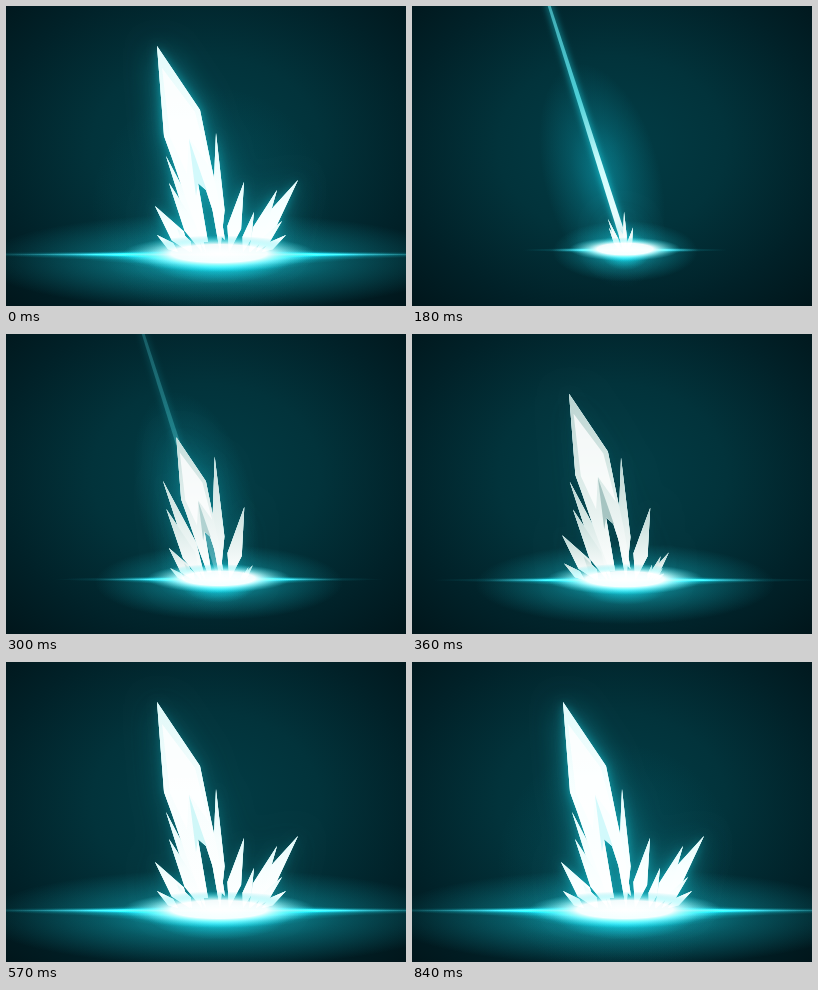
An HTML page with a canvas that plays this animation: 400 by 300 pixels, repeating every 1.34 s.

```html
<!DOCTYPE html>
<html lang="en">
<head>
<meta charset="utf-8">
<title>Ice burst</title>
<style>
html, body { margin: 0; width: 100%; height: 100%; overflow: hidden; background: #01161b; }
canvas { display: block; width: 100vw; height: 100vh; }
</style>
</head>
<body>
<canvas id="stage" width="400" height="300"></canvas>
<script>
const ctx = document.getElementById('stage').getContext('2d');
const LOOP = 1340, STEP = 30, HOLD = 90;
const CX = 213;
const CYAN = '24,196,208', TEAL = '16,150,165';

const rgba = (c, a) => `rgba(${c},${a})`;
const mix = (a, b, p) => a + (b - a) * p;
const ramp = (t, from, to) => Math.min(1, Math.max(0, (t - from) / (to - from)));

// Shoots up to an overshoot, then settles at 1
function burst(t, start, peak, end, over) {
  if (t < peak) return over * Math.sin(ramp(t, start, peak) * Math.PI / 2);
  return mix(1, over, (1 + Math.cos(ramp(t, peak, end) * Math.PI)) / 2);
}

const groups = {
  main:  { x: 213, y: 243, size: t => burst(t, 160, 480, 570, 1.085) },
  mid:   { x: 213, y: 243, size: t => burst(t, 150, 300, 480, 1.04) },
  left:  { x: 195, y: 246, size: t => burst(t, 210, 400, 570, 1.03) },
  right: { x: 235, y: 246, size: t => ramp(t, 230, 570) }
};

// group, tip x, tip y, foot x, width
const spikes = [
  ['mid', 160, 150, 200, 12],
  ['mid', 163, 177, 196, 13],
  ['mid', 210, 127, 214, 12],
  ['mid', 238, 176, 223, 14],
  ['left', 149, 200, 184, 15],
  ['left', 151, 229, 172, 8],
  ['left', 171, 222, 186, 9],
  ['right', 292, 174, 244, 17],
  ['right', 271, 184, 243, 13],
  ['right', 248, 206, 237, 9],
  ['right', 276, 215, 250, 9],
  ['right', 280, 229, 256, 8]
];
const body = [
  151, 40, 194, 104, 205, 158, 212, 190, 219, 234, 215, 230, 200, 184,
  192, 177, 202, 236, 196, 236, 181, 196, 166, 152, 158, 130
];
const facet = [156, 62, 189, 106, 203, 160, 183, 132, 181, 168, 164, 131];
const cleft = [183, 133, 201, 185, 192, 177, 190, 190];

// Kite that is widest near its foot
function kite(tx, ty, fx, width) {
  const fy = 246, dx = fx - tx, dy = fy - ty, len = Math.hypot(dx, dy);
  const mx = tx + dx * .65, my = ty + dy * .65;
  const nx = -dy / len * width / 2, ny = dx / len * width / 2;
  return [tx, ty, mx - nx, my - ny, fx, fy, mx + nx, my + ny];
}

// Scales points from the group's root; an overshoot also leans left
function grow(name, pts, t) {
  const { x, y, size } = groups[name], s = size(t);
  const lean = -.25 * Math.max(0, s - 1);
  const c = s * Math.cos(lean), n = s * Math.sin(lean), out = [];
  for (let i = 0; i < pts.length; i += 2) {
    const dx = pts[i] - x, dy = pts[i + 1] - y;
    out.push(x + dx * c - dy * n, y + dx * n + dy * c);
  }
  return out;
}

function poly(pts) {
  const path = new Path2D();
  path.moveTo(pts[0], pts[1]);
  for (let i = 2; i < pts.length; i += 2) path.lineTo(pts[i], pts[i + 1]);
  path.closePath();
  return path;
}

// Soft ellipse; stops are offset/colour pairs
function glow(x, y, rx, ry, stops, turn = 0) {
  ctx.save();
  ctx.translate(x, y);
  ctx.rotate(turn);
  ctx.scale(rx, ry);
  const g = ctx.createRadialGradient(0, 0, 0, 0, 0, 1);
  stops.forEach(([o, c]) => g.addColorStop(o, c));
  ctx.fillStyle = g;
  ctx.fillRect(-1, -1, 2, 2);
  ctx.restore();
}

const fade = (c, a) => [[0, rgba(c, a)], [.5, rgba(c, a * .42)], [1, rgba(c, 0)]];

function backdrop() {
  ctx.fillStyle = '#01161b';
  ctx.fillRect(0, 0, 400, 300);
  glow(200, 140, 285, 225, [[0, '#023d46'], [.4, '#02333b'], [.75, '#012128'], [1, '#01161b']]);
}

function drawBeam(t) {
  const alpha = 1 - ramp(t, 240, 330);
  if (!alpha) return;
  const len = mix(38, 260, ramp(t, 90, 180));
  const x = 214.5, y = 243, tx = x - .303 * len, ty = y - .953 * len;
  const w = Math.min(3.6, 2 + len / 100), tip = len / 180;
  const g = ctx.createLinearGradient(x, y, tx, ty);
  g.addColorStop(0, '#ffffff');
  g.addColorStop(.35, '#c9fbfc');
  g.addColorStop(.6, '#4fd0d8');
  g.addColorStop(1, '#3fa9b2');
  ctx.save();
  ctx.globalAlpha = alpha;
  ctx.shadowColor = '#19c6d4';
  ctx.shadowBlur = 7;
  ctx.fillStyle = g;
  ctx.fill(poly([x - w, y, tx - tip, ty, tx + tip, ty, x + w, y]));
  ctx.restore();
}

function drawShards(t) {
  const flash = 1 - ramp(t, 220, 340);
  const white = .75 * flash + ramp(t, 360, 580);
  const halo = .08 + .25 * flash + .25 * ramp(t, 360, 600) + .35 * ramp(t, 600, 840);
  const tint = (...pairs) => pairs.map(([a, b]) => Math.round(mix(a, b, white))).join();

  const shapes = [...spikes.map(([name, ...s]) => [name, kite(...s)]), ['main', body]]
    .filter(([name]) => groups[name].size(t) > 0)
    .map(([name, pts]) => grow(name, pts, t));
  if (!shapes.length) return;

  const all = new Path2D();
  shapes.forEach(pts => all.addPath(poly(pts)));
  ctx.save();
  ctx.fillStyle = '#d8f8f8';
  for (const blur of [30, 10]) {
    ctx.shadowColor = rgba('20,180,195', halo);
    ctx.shadowBlur = blur;
    ctx.fill(all);
  }
  ctx.restore();

  shapes.forEach(pts => {
    const g = ctx.createLinearGradient(0, pts[1], 0, 240);
    g.addColorStop(0, rgba(tint([186, 226], [211, 250], [208, 250]), 1));
    g.addColorStop(.45, rgba(tint([218, 248], [234, 255], [231, 255]), 1));
    g.addColorStop(1, '#ffffff');
    ctx.fillStyle = g;
    ctx.fill(poly(pts));
  });

  if (groups.main.size(t) > .5) {
    ctx.fillStyle = 'rgba(255,255,255,.8)';
    ctx.fill(poly(grow('main', facet, t)));
    ctx.fillStyle = rgba(tint([150, 200], [185, 248], [183, 250]), .8);
    ctx.fill(poly(grow('main', cleft, t)));
  }
}

function drawFlare(t) {
  const p = ramp(t, 90, 570), q = Math.sqrt(p);
  const y = 243 + 5.5 * p, w = mix(59, 300, p), h = mix(.6, 1, q);
  ctx.save();
  ctx.globalCompositeOperation = 'lighter';
  glow(CX, y + 7 * p, mix(34, 240, p), mix(17, 48, q), fade(CYAN, .6));
  // Nested ellipses, each shorter and taller, make a lens with pointed ends
  for (let i = 0; i < 5; i++) {
    glow(CX, y + i * p, w * .7 ** i, 3 * h * 1.7 ** i, fade(CYAN, .5));
  }
  glow(CX, y, w * .75, 1.6, fade('170,245,250', .8));
  ctx.restore();
}

function drawCore(t) {
  const p = ramp(t, 90, 570), q = Math.sqrt(p);
  glow(CX, 242 + 5.5 * p, mix(25, 96, q), mix(7, 18, q), [
    [0, '#fff'], [.5, rgba('255,255,255', .95)], [.68, rgba('170,250,252', .6)], [1, rgba('60,220,230', 0)]
  ]);
}

function drawAura(t) {
  const flash = .5 * Math.sin(Math.PI * ramp(t, 90, 360));
  ctx.save();
  ctx.globalCompositeOperation = 'lighter';
  glow(190, 170, 58, 115, fade(TEAL, flash), -.25);
  glow(205, 200, 120, 120, fade(TEAL, .14 * ramp(t, 570, 840)));
  ctx.restore();
}

function draw(t) {
  backdrop();
  drawAura(t);
  drawFlare(t);
  drawBeam(t);
  drawShards(t);
  drawCore(t);
}

const start = performance.now();
function tick(now) {
  const t = Math.max(0, now - start) % LOOP;
  // The loop opens on the finished burst, then cuts to the spark
  draw(t < HOLD ? LOOP : Math.floor(t / STEP) * STEP);
  requestAnimationFrame(tick);
}
draw(LOOP);
requestAnimationFrame(tick);
</script>
</body>
</html>
```
